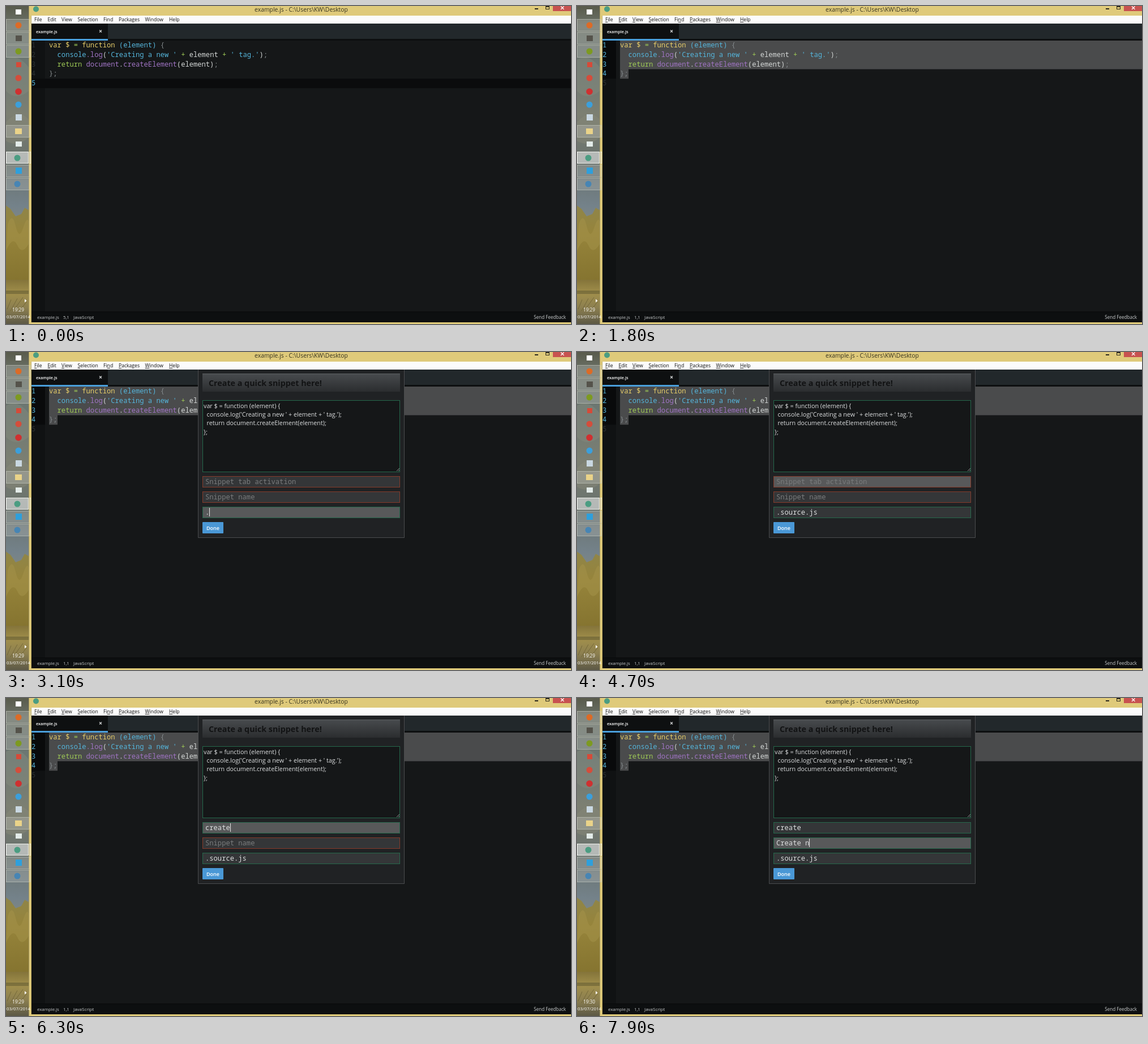
An HTML page for the animation above (8000 ms loop, 998 by 561 pixels).

```html
<!DOCTYPE html>
<html lang="en">
<head>
<meta charset="utf-8">
<title>Quick snippet</title>
<style>
  html, body { margin: 0; width: 100%; height: 100%; overflow: hidden; background: #151718; }
  svg { display: block; width: 998px; height: 561px; }
  text { font-family: "Open Sans", "Noto Sans", sans-serif; white-space: pre; }
  .mono { font-family: "Noto Sans Mono", "DejaVu Sans Mono", monospace; font-size: 12.15px; }
  .mnemonics .key { text-decoration: underline; }
</style>
</head>
<body>
<svg id="stage" viewBox="0 0 998 561" xmlns="http://www.w3.org/2000/svg">
  <defs>
    <linearGradient id="sky" x2="0" y2="1">
      <stop offset="0" stop-color="#595b4c"/>
      <stop offset=".06" stop-color="#6c7268"/>
      <stop offset=".2" stop-color="#6c7874"/>
      <stop offset=".34" stop-color="#7c7f72"/>
      <stop offset=".5" stop-color="#68716d"/>
      <stop offset=".63" stop-color="#74828a"/>
      <stop offset=".66" stop-color="#7b8586"/>
    </linearGradient>
    <linearGradient id="trees" x2="0" y2="1">
      <stop offset="0" stop-color="#8f8549"/>
      <stop offset=".35" stop-color="#96843b"/>
      <stop offset="1" stop-color="#84732f"/>
    </linearGradient>
    <linearGradient id="ground" x2="0" y2="1">
      <stop offset="0" stop-color="#84743a"/>
      <stop offset=".3" stop-color="#a18f4b"/>
      <stop offset=".62" stop-color="#8d8050"/>
      <stop offset="1" stop-color="#5d5946"/>
    </linearGradient>
    <linearGradient id="heading" x2="0" y2="1">
      <stop offset="0" stop-color="#484b4e"/>
      <stop offset="1" stop-color="#2b2d2f"/>
    </linearGradient>
  </defs>
</svg>
<script>
const NS = 'http://www.w3.org/2000/svg';
const stage = document.getElementById('stage');
const LOOP = 8000, CHAR = 7.29, ROW = 16.8, TOP = 61;
const PICK = 400, PICKED = 600, HOME = 1300, ALT = 1800, OPEN = 2300, SUBMIT = 4700;
const GOLD = '#dfca7a', BLUE = '#55b5db', YELLOW = '#e6cd69', GREEN = '#9fca56',
      PURPLE = '#a074c4', PLAIN = '#d4d7d6', GREY = '#858b8d',
      VALID = '#25684b', INVALID = '#853b2b';

function add(tag, attrs, parent = stage) {
  const node = document.createElementNS(NS, tag);
  for (const key in attrs) node.setAttribute(key, attrs[key]);
  return parent.appendChild(node);
}
const rect = (x, y, width, height, fill, parent, more) =>
  add('rect', { x, y, width, height, fill, ...more }, parent);
const circle = (cx, cy, r, fill) => add('circle', { cx, cy, r, fill });
function text(x, y, str, size, fill, parent, more) {
  const node = add('text', { x, y, 'font-size': size, fill, ...more }, parent);
  node.textContent = str;
  return node;
}
const mono = (x, y, str, fill, parent) =>
  text(x, y, str, null, fill, parent, { class: 'mono' });
const show = (node, on) => node.setAttribute('visibility', on ? 'visible' : 'hidden');

// Desktop strip
rect(0, 0, 40, 561, 'url(#sky)');
add('path', { d: 'M0 95Q20 82 40 108V150Q18 168 0 150Z', fill: '#858a7c', opacity: .45 });
add('path', { d: 'M0 205Q22 180 40 200V232Q20 250 0 238Z', fill: '#8a8b78', opacity: .4 });
add('path', { d: 'M0 352L8 358L17 371L27 367L33 356L40 360V490H0Z', fill: 'url(#trees)' });
add('path', { d: 'M3 385Q11 362 17 388T30 392T40 380V420Q28 440 20 422T0 432Z', fill: '#a6934a', opacity: .5 });
rect(0, 483, 40, 78, 'url(#ground)');
add('path', { d: 'M0 502H40V508H0Z', fill: '#665e34', opacity: .6 });
add('path', { d: 'M2 535L9 518M8 538L20 516M14 536L30 514M24 538L36 522', stroke: '#675c31', opacity: .7 });

// Window frame
rect(40, 0, 958, 561, GOLD);
rect(40, 0, 1, 561, '#a89a60');
rect(44, 17, 1, 541, '#c2af64');
for (const y of [23, 46, 69, 210, 280, 303])
  rect(.5, y + .5, 43, 21, '#ffffff', stage, { 'fill-opacity': .17, stroke: '#c5c8bd', 'stroke-opacity': .65 });
rect(.5, 257.5, 39, 20, '#ffffff', stage, { 'fill-opacity': .5, stroke: '#f0f1ec' });
rect(41.5, 257.5, 2, 20, 'none', stage, { stroke: '#f0efe0' });

// Taskbar marks
rect(17, 6, 10, 9, '#ffffff');
circle(22, 34, 5.5, '#dc6b26');
rect(17, 52, 11, 10, '#55534b');
circle(22, 80, 5.5, '#7d9a20');
rect(18, 99, 9, 9, '#d64a38');
circle(22, 127, 5.5, '#d44d3b');
circle(22, 151, 5.8, '#cf3030');
circle(22, 174, 5.5, '#3b9fdc');
rect(17, 191, 11, 11, '#c9d8e2');
rect(16, 216, 12, 10, '#ead389');
rect(17, 239, 11, 9, '#e3ebe8');
circle(20, 268, 5.5, '#4b9d82');
rect(17, 285, 11, 11, '#2e9fdc');
circle(20, 314, 5.5, '#4785b4');
add('path', { d: 'M33 517L36.5 520L33 523Z', fill: '#ffffff' });
const clock = text(21.5, 539, '', 8.2, '#ffffff', stage, { 'text-anchor': 'middle' });
text(22, 551, '03/07/2014', 7.9, '#ffffff', stage, { 'text-anchor': 'middle' });

// Title and menu
circle(53, 5.5, 5, '#4b9d82');
text(521.5, 9.5, 'example.js - C:\\Users\\KW\\Desktop', 10.4, '#37331f', stage, { 'text-anchor': 'middle' });
rect(934, 4, 6, 2, '#2b281c');
rect(953.5, .5, 6, 5, 'none', stage, { stroke: '#2b281c' });
rect(953, 0, 7, 2, '#2b281c');
rect(966, 0, 32, 9, '#c85250');
add('path', { d: 'M980 .5L985.5 6M985.5 .5L980 6', stroke: '#ffffff', 'stroke-width': 1.3 });
rect(45, 17, 953, 14, '#fbfbfb');
const menu = add('g', {});
[[50, 'File'], [73.5, 'Edit'], [98, 'View'], [126.5, 'Selection'], [172, 'Find', 2],
 [199, 'Packages'], [245.5, 'Window'], [288, 'Help']].forEach(([x, word, key = 0]) => {
  const item = text(x, 27, '', 8.6, '#111111', menu);
  [word.slice(0, key), word[key], word.slice(key + 1)].forEach((part, i) => {
    add('tspan', i === 1 ? { class: 'key' } : {}, item).textContent = part;
  });
});

// Tabs and editor
rect(45, 31, 953, 30, '#22282b');
rect(45, 58, 953, 3, '#0d0f10');
rect(45, 31, 135, 27, '#0e1011');
rect(45, 58, 135, 3, '#4a9fdb');
text(53, 47.5, 'example.js', 7.3, '#ffffff', stage, { 'font-weight': 600 });
add('path', { d: 'M165 42.5L169 46.5M169 42.5L165 46.5', stroke: '#d0d2d3', 'stroke-width': 1.2 });
rect(45, 61, 953, 479, '#151718');
rect(45, 61, 24, 479, '#101213');
const cursorLine = rect(45, 0, 953, ROW, '#0b0c0d');
const gutterSel = rect(45, 0, 24, 0, '#090a0b');
const selection = add('path', { fill: '#4a4b4c' });
const numbers = [1, 2, 3, 4, 5].map((n, i) => mono(45, 73 + i * ROW, n));

const code = [
  [['var', YELLOW], [' $ ', YELLOW], ['=', GREEN], [' function', YELLOW], [' (element)', BLUE], [' {', GREY]],
  [['  console', BLUE], ['.log', PURPLE], ['(', PLAIN], ["'Creating a new '", BLUE], [' +', GREEN],
   [' element', PLAIN], [' +', GREEN], [" ' tag.'", BLUE], [')', PLAIN], [';', GREY]],
  [['  return', GREEN], [' document', PURPLE], ['.', PLAIN], ['createElement', PURPLE],
   ['(element)', PLAIN], [';', GREY]],
  [['};', GREY]]
];
code.forEach((line, i) => {
  const row = mono(76, 73 + i * ROW, '', PLAIN);
  line.forEach(([part, fill]) => { add('tspan', { fill }, row).textContent = part; });
});

// Status bar
rect(45, 540, 953, 18, '#0d0f10');
rect(45, 539, 953, 1, '#08090a');
text(55, 551.5, 'example.js', 7.8, '#c9cccd');
const place = text(101, 551.5, '', 7.8, '#c9cccd');
const grammar = text(119, 551.5, 'JavaScript', 8, '#c9cccd');
text(989, 551.5, 'Send Feedback', 8.1, '#c9cccd', stage, { 'text-anchor': 'end' });
rect(45, 558, 953, 3, GOLD);

// Snippet panel
const panel = add('g', {});
rect(339, 31, 365, 297, '#202224', panel);
add('path', { d: 'M339.5 31V327.5H703.5V31', fill: 'none', stroke: '#4a4c4e' }, panel);
rect(347, 38, 349, 32, 'url(#heading)', panel);
rect(347, 38, 349, 1, '#5b5f61', panel);
text(358, 60, 'Create a quick snippet here!', 14.3, '#121314', panel, { 'font-weight': 700 });
rect(347, 85, 349, 127, '#151718', panel);
const areaEdge = rect(347.5, 85.5, 348, 126, 'none', panel, { stroke: VALID });
code.forEach((line, i) =>
  text(349, 98.5 + i * 15.4, line.map(part => part[0]).join(''), 10.75, '#dcdedf', panel));
add('path', { d: 'M690 210L695 205M693 210L695 208', stroke: '#909293' }, panel);

function field(y, hint) {
  rect(347.5, y + .5, 348, 19, '#343638', panel, { stroke: '#0c0d0e' });
  const glow = rect(348, y + 1, 347, 18, '#58595a', panel);
  const edge = rect(347.5, y + .5, 348, 19, 'none', panel);
  return { y, hint, glow, edge, label: mono(352, y + 14, '', PLAIN, panel) };
}
const trigger = field(219, 'Snippet tab activation');
const title = field(246, 'Snippet name');
const scope = field(273, 'Snippet selector (ex: `.source.js`)');
rect(347, 300, 37, 20, '#4a98d6', panel, { rx: 1 });
text(365.5, 314, 'Done', 9, '#ffffff', panel, { 'text-anchor': 'middle', 'font-weight': 600 });
const caret = rect(0, 0, 1, 15, '#e6e6e6', panel);

const typed = (t, str, start) =>
  str.slice(0, Math.max(0, Math.floor((t - start) / 100) + 1));
const within = (t, spans) => spans.some(([a, b]) => t >= a && t < b);
const ramp = (t, start, span) => Math.max(0, Math.min(1, (t - start) / span));

function fill(f, value, t, from, to) {
  f.value = value;
  f.label.textContent = value || f.hint;
  f.label.setAttribute('fill', value ? '#dcdedf' : '#7a7c7d');
  f.glow.setAttribute('opacity', t >= from && t < to ? 1 : 0);
  f.edge.setAttribute('stroke', value ? VALID : INVALID);
  f.edge.setAttribute('opacity', ramp(t, OPEN, 300));
}

// Selection from a column of one line down to the end of line 4
function select(line, column) {
  const x = 76 + (column - 1) * CHAR, y = TOP + (line - 1) * ROW;
  const below = y + ROW, last = TOP + 3 * ROW, end = last + ROW;
  selection.setAttribute('d', `M${x} ${y}H998V${last}H91V${end}H76V${below}H${x}Z`);
  gutterSel.setAttribute('y', y);
  gutterSel.setAttribute('height', end - y);
}

function draw(now) {
  const t = Math.floor(now % LOOP / 100) * 100;
  const selecting = t >= PICK;
  const [line, column] = t < 200 ? [5, 1] : t < PICK ? [4, 3] : t < PICKED ? [3, 15]
    : t < HOME ? [1, 29] : [1, 1];

  clock.textContent = t < 7500 ? '19:29' : '19:30';
  place.textContent = line + ',' + column;
  grammar.setAttribute('x', column > 9 ? 123.5 : 119);
  menu.setAttribute('class', t >= ALT ? 'mnemonics' : '');

  show(cursorLine, !selecting);
  show(gutterSel, selecting);
  show(selection, selecting);
  cursorLine.setAttribute('y', TOP + (line - 1) * ROW);
  select(line, column);
  numbers.forEach((n, i) => {
    const lit = i + 1 >= line && i + 1 <= (selecting ? 4 : line);
    n.setAttribute('fill', lit ? BLUE : '#2b3134');
  });

  panel.setAttribute('display', t >= OPEN ? 'inline' : 'none');
  areaEdge.setAttribute('opacity', ramp(t, OPEN, 300));
  fill(trigger, typed(t, 'create', 5800), t, SUBMIT, 6500);
  fill(title, typed(t, 'Create n', 7200), t, 6500, LOOP);
  fill(scope, t >= SUBMIT ? '.source.js' : typed(t, '.so', 3100), t, 3000, SUBMIT);

  const active = t < 3000 ? null : t < SUBMIT ? scope : t < 6500 ? trigger : title;
  const blink = within(t, [[OPEN, 3600], [4000, 4400], [5100, 5400], [5900, 6500], [6900, LOOP]]);
  caret.setAttribute('opacity', blink ? 1 : 0);
  caret.setAttribute('x', active ? Math.round(352 + active.value.length * CHAR) : 349);
  caret.setAttribute('y', active ? active.y + 2 : 87);
}

function tick() {
  draw(performance.now());
  requestAnimationFrame(tick);
}
tick();
</script>
</body>
</html>
```
